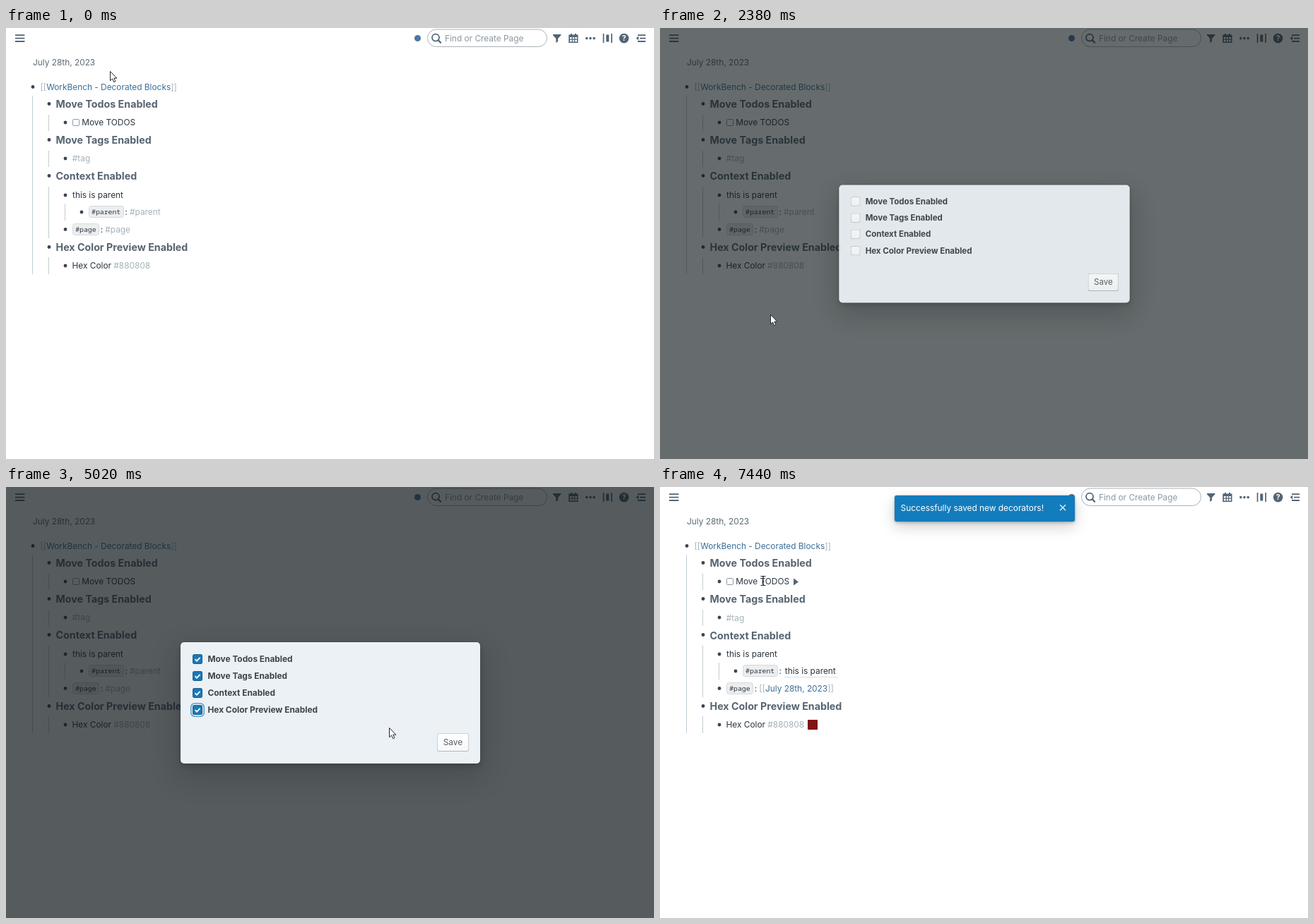
An HTML page for the animation above (8000 ms loop, 917 by 611 pixels).

```html
<!DOCTYPE html>
<html lang="en">
<head>
<meta charset="utf-8">
<title>Decorated blocks</title>
<style>
  :root { --t: 0ms; --pop: cubic-bezier(.54, 1.12, .38, 1.11); }
  html, body { margin: 0; width: 100%; height: 100%; overflow: hidden; background: #fff; }
  body { position: relative; font: 11.87px Inter, sans-serif; }
  svg, div { position: absolute; box-sizing: border-box; }
  svg { left: 0; top: 0; overflow: visible; }
  [data-on] { visibility: hidden; }
  [data-on].on { visibility: visible; }

  /* Page */
  .text { fill: #2a363f; white-space: pre; }
  .head { font-size: 14.25px; font-weight: 700; fill: #566472; }
  .soft { fill: #a3b3b8; }
  .link { fill: #3b6f98; }
  .code { font: 9.8px "Noto Sans Mono", monospace; fill: #2b363e; }
  .chip { fill: #eceeef; stroke: #d6dadd; }
  .dot { fill: #3d4258; }
  .guide { fill: none; stroke: #c1cdd4; }
  .icon { fill: #526577; }
  .line { fill: none; stroke: #526577; stroke-width: 1.8; }
  .nudge { animation: nudge 1ms linear paused forwards; animation-delay: calc(7220ms - var(--t)); }

  /* Dialog */
  #shade {
    inset: 0; background: rgba(15, 24, 26, .7);
    animation: fade-in 200ms cubic-bezier(.4, 1, .75, .9) paused both,
               fade-out 200ms cubic-bezier(.4, 1, .75, .9) paused forwards;
  }
  #dialog {
    left: 247px; top: 220px; width: 424px; height: 172px;
    border-radius: 5px; background: #ebf1f5;
    box-shadow: 0 0 0 1px rgba(16, 22, 26, .1), 0 3px 7px rgba(16, 22, 26, .2), 0 15px 39px 5px rgba(16, 22, 26, .2);
    animation: grow 300ms var(--pop) paused both, shrink 300ms var(--pop) paused forwards;
  }
  #shade, #dialog { animation-delay: calc(2243ms - var(--t)), calc(5400ms - var(--t)); }
  .option { left: 17px; height: 14px; line-height: 15px; padding-left: 21.5px; white-space: nowrap; font-weight: 700; color: #3c454c; }
  .box, .tick, .ring { left: 0; top: 0; width: 14px; height: 14px; border-radius: 3px; }
  .box { background: linear-gradient(#fff, #f6f9fa); box-shadow: inset 0 0 0 1px rgba(16, 22, 26, .2); }
  .tick { background: #1a79b8; box-shadow: inset 0 0 0 1px rgba(16, 22, 26, .25); }
  .ring { box-shadow: 0 0 0 1.4px #ebf1f5, 0 0 0 3px #5d9fcb; }
  .save {
    left: 363px; top: 129px; width: 45px; height: 26px; line-height: 26px; text-align: center; color: #596067;
    border-radius: 3px; background: linear-gradient(#fff, #f5f8fa);
    box-shadow: inset 0 0 0 1px rgba(16, 22, 26, .2), inset 0 -1px 0 rgba(16, 22, 26, .1);
  }

  /* Toast */
  #toast {
    left: 332px; top: 12px; width: 255px; height: 36.5px; line-height: 37px; padding-left: 8.6px;
    border-radius: 3px; background: #137cbd; color: #fff; white-space: nowrap;
    box-shadow: 0 0 0 1px rgba(16, 22, 26, .1), 0 2px 4px rgba(16, 22, 26, .2), 0 7px 20px rgba(16, 22, 26, .2);
    animation: drop 300ms var(--pop) paused both; animation-delay: calc(5753ms - var(--t));
  }

  /* Pointer */
  #pointer { width: 1px; height: 1px; animation: travel 8s linear paused both; animation-delay: calc(0ms - var(--t)); }
  #pointer path { stroke-linejoin: round; }

  @keyframes fade-in { from { opacity: 0 } to { opacity: 1 } }
  @keyframes fade-out { from { opacity: 1 } to { opacity: 0 } }
  @keyframes grow { from { opacity: 0; transform: scale(.5) } to { opacity: 1; transform: none } }
  @keyframes shrink { from { opacity: 1; transform: none } to { opacity: 0; transform: scale(.5) } }
  @keyframes drop { from { transform: translateY(-40px) } to { transform: none } }
  @keyframes nudge { to { transform: translateY(1px) } }
  @keyframes travel {
    0%, 4.1% { transform: translate(147px, 61px); animation-timing-function: ease-in-out }
    14.5% { transform: translate(44px, 286px); animation-timing-function: ease-in-out }
    21.3% { transform: translate(165px, 397px); animation-timing-function: ease-out }
    23.8%, 30.6% { transform: translate(156px, 406px); animation-timing-function: ease-in-out }
    38.3%, 40.3% { transform: translate(301px, 231px); animation-timing-function: ease-in-out }
    43.8%, 47% { transform: translate(301px, 267px); animation-timing-function: ease-in-out }
    49%, 53% { transform: translate(301px, 290px); animation-timing-function: ease-in-out }
    55.8%, 58.4% { transform: translate(301px, 312px); animation-timing-function: ease-in }
    61.87% { transform: translate(494px, 332px) }
    62.75% { transform: translate(542px, 341px); animation-timing-function: ease-out }
    65.4%, 67.5% { transform: translate(630px, 360px); animation-timing-function: ease-in-out }
    72.37% { transform: translate(322px, 408px); animation-timing-function: ease-in-out }
    82.5% { transform: translate(27px, 333px); animation-timing-function: ease-in-out }
    93%, 100% { transform: translate(146px, 133px) }
  }
</style>
</head>
<body>
<svg width="917" height="611" viewBox="0 0 917 611">
  <!-- Top bar -->
  <path class="line" d="M13 10.2h13.4M13 14.6h13.4M13 19h13.4"/>
  <circle cx="582.5" cy="14.5" r="4.5" fill="#4c76a2"/>
  <rect x="596.5" y="2" width="169" height="24.5" rx="12.2" fill="#fff" stroke="#a9b2b9"/>
  <circle class="line" cx="608" cy="13.6" r="5"/>
  <path class="line" d="M611.6 17.2l3.4 3.4" style="stroke-width:2.3;stroke-linecap:round"/>
  <text x="621" y="18.5" fill="#8a98a4">Find or Create Page</text>
  <path class="icon" d="M774 9h11.4v1.2l-4.3 4.8v4l-2.8 2v-6L774 10.2z"/>
  <path class="icon" fill-rule="evenodd" d="M796.3 9.5H799V8h2v1.5h4V8h2v1.5h2.5V21H796.3zM798 13v6.5h10V13z"/>
  <path class="line" d="M798 16.2h10M801.3 13v7M804.7 13v7" style="stroke-width:1.2"/>
  <path class="line" d="M821.8 14.6h0M827 14.6h0M832.2 14.6h0" style="stroke-width:3.6;stroke-linecap:round"/>
  <path class="icon" d="M844.7 8h1.7v13h-1.7zM849.3 9.5h4v10h-4zM856.3 8h1.7v13h-1.7z"/>
  <circle class="icon" cx="874.6" cy="14.6" r="6.8"/>
  <text x="874.6" y="18.4" text-anchor="middle" font-size="10.5" font-weight="700" fill="#fff">?</text>
  <path class="line" d="M894 10.2h11M897 14.6h8.2M894 19h11"/>
  <path class="icon" d="M891.6 14.6l3.6-3v6z"/>

  <!-- Outline -->
  <text x="38" y="53.3" fill="#5c6b77">July 28th, 2023</text>
  <path class="guide" d="M37.5 96V349M60.5 123v23M60.5 174v23M60.5 225v73M60.5 325v24M83.5 249v24"/>
  <g id="bullets" class="dot"></g>
  <g class="text">
    <text class="soft" x="48.5" y="87.5">[[<tspan class="link">WorkBench - Decorated Blocks</tspan>]]</text>
    <path data-on="450-560" d="M57 89.5H233.5" stroke="#3b6f98"/>
    <text class="head" x="70.5" y="113">Move Todos Enabled</text>
    <rect x="94.5" y="129.5" width="9" height="9" rx="1" fill="#fff" stroke="#8b9aa5"/>
    <text x="107.2" y="138.3">Move TODOS</text>
    <path data-on="7220-8000" class="icon" d="M189 129.5l7 5-7 5z"/>
    <text class="head" x="70.5" y="164">Move Tags Enabled</text>
    <text class="soft nudge" x="93.8" y="189.3">#tag</text>
    <text class="head nudge" x="70.5" y="214.8">Context Enabled</text>
    <text x="94" y="241.2">this is parent</text>
    <rect class="chip" x="117.5" y="252.5" width="49" height="16" rx="3"/>
    <text class="code" x="121" y="264.3">#parent</text>
    <text x="168.5" y="265">:</text>
    <rect class="chip" x="94.5" y="277.5" width="37" height="16" rx="3"/>
    <text class="code" x="98.2" y="289">#page</text>
    <text x="133.8" y="289.5">:</text>
    <g data-on="0-5753">
      <text class="soft" x="175" y="265">#parent</text>
      <text class="soft" x="140.3" y="289.5">#page</text>
    </g>
    <g data-on="5753-8000">
      <text x="176.8" y="265">this is parent</text>
      <path d="M176 269.5h76" stroke="#d8dfe3"/>
      <text class="soft" x="140.3" y="289.5">[[<tspan class="link">July 28th, 2023</tspan>]]</text>
      <rect x="209" y="330" width="14" height="14" fill="#821317"/>
    </g>
    <text class="head" x="70.5" y="315.8">Hex Color Preview Enabled</text>
    <text x="93.5" y="341.3">Hex Color <tspan class="soft">#880808</tspan></text>
  </g>
</svg>

<div id="shade"></div>
<div id="dialog"><div class="save">Save</div></div>

<div id="toast" data-on="5753-8000">Successfully saved new decorators!
  <svg width="255" height="37"><path d="M234 13.2l8 8M242 13.2l-8 8" stroke="#d5e8f4" stroke-width="1.6"/></svg>
</div>

<svg id="pointer">
  <path data-on="0-450 560-600 900-2870 4800-5180 5470-7150" fill="#fff" stroke="#23262b"
    d="M.5.5V13.7L3.5 11l2.2 4.7 2.2-1L5.8 10.2H9.8z"/>
  <path data-on="450-560 2870-4800 5180-5470" fill="#fff" stroke="#23262b"
    d="M-1.5 10V1.5a1.5 1.5 0 0 1 3 0V6.5Q4 5.8 4 7.5 6.3 6.8 6.5 8.5 9 8 9 10v3.5L7.5 17.5H-.5L-4.8 11.5Q-5.2 9-3 9.3z"/>
  <path data-on="600-900 7150-8000" fill="none" stroke="#23262b" stroke-width="1.2"
    d="M-3.5-6.5h2.5l1 1 1-1h2.5M0-5.5v11M-3.5 6.5h2.5l1-1 1 1h2.5M-1.5 1h3"/>
</svg>

<script>
  const LOOP = 8000;
  // Screen activity: start, end, number of redraws. The picture rests in between.
  const bursts = [
    [390, 1160, 12], [1230, 1910, 10], [2310, 3070, 12], [3150, 3510, 6], [3710, 3920, 4],
    [4190, 4950, 12], [5020, 5790, 12], [5860, 6600, 12], [6670, 7440, 12],
  ];
  const bullets = [
    [0, 83.5], [1, 107.5], [2, 134], [1, 158.5], [2, 185], [1, 209.5],
    [2, 237], [3, 261], [2, 285.5], [1, 310.5], [2, 337],
  ];
  const options = [
    ["Move Todos Enabled", 3150], ["Move Tags Enabled", 3710],
    ["Context Enabled", 4190], ["Hex Color Preview Enabled", 4600],
  ];

  document.getElementById("bullets").innerHTML = bullets
    .map(([level, y]) => `<circle cx="${38 + 23 * level}" cy="${y}" r="2.4"/>`).join("");

  document.getElementById("dialog").insertAdjacentHTML("afterbegin", options.map(([label, from], i) => {
    const next = options[i + 1]?.[1] ?? LOOP;
    return `<div class="option" style="top:${17.4 + 23.8 * i}px">${label}
      <div class="box"></div>
      <div class="ring" data-on="${from}-${next}"></div>
      <div class="tick" data-on="${from}-${LOOP}"><svg width="14" height="14">
        <path d="M3.6 7.2l2.4 2.4 4.5-4.8" fill="none" stroke="#fff" stroke-width="1.8"/></svg></div>
    </div>`;
  }).join(""));

  const timed = [...document.querySelectorAll("[data-on]")].map(el => ({
    el, spans: el.dataset.on.split(" ").map(span => span.split("-").map(Number)),
  }));

  function lastRedraw(t) {
    let shown = 0;
    for (const [start, end, count] of bursts) {
      if (t < start) break;
      const step = (end - start) / (count - 1);
      shown = Math.min(end, start + Math.floor((t - start + 10) / step) * step);
    }
    return shown;
  }

  function render(now) {
    const t = lastRedraw(now % LOOP);
    document.documentElement.style.setProperty("--t", t + "ms");
    for (const { el, spans } of timed) {
      el.classList.toggle("on", spans.some(([from, to]) => t >= from && t < to));
    }
  }

  const begin = performance.now();
  function tick() {
    render(performance.now() - begin);
    requestAnimationFrame(tick);
  }
  tick();
</script>
</body>
</html>
```
